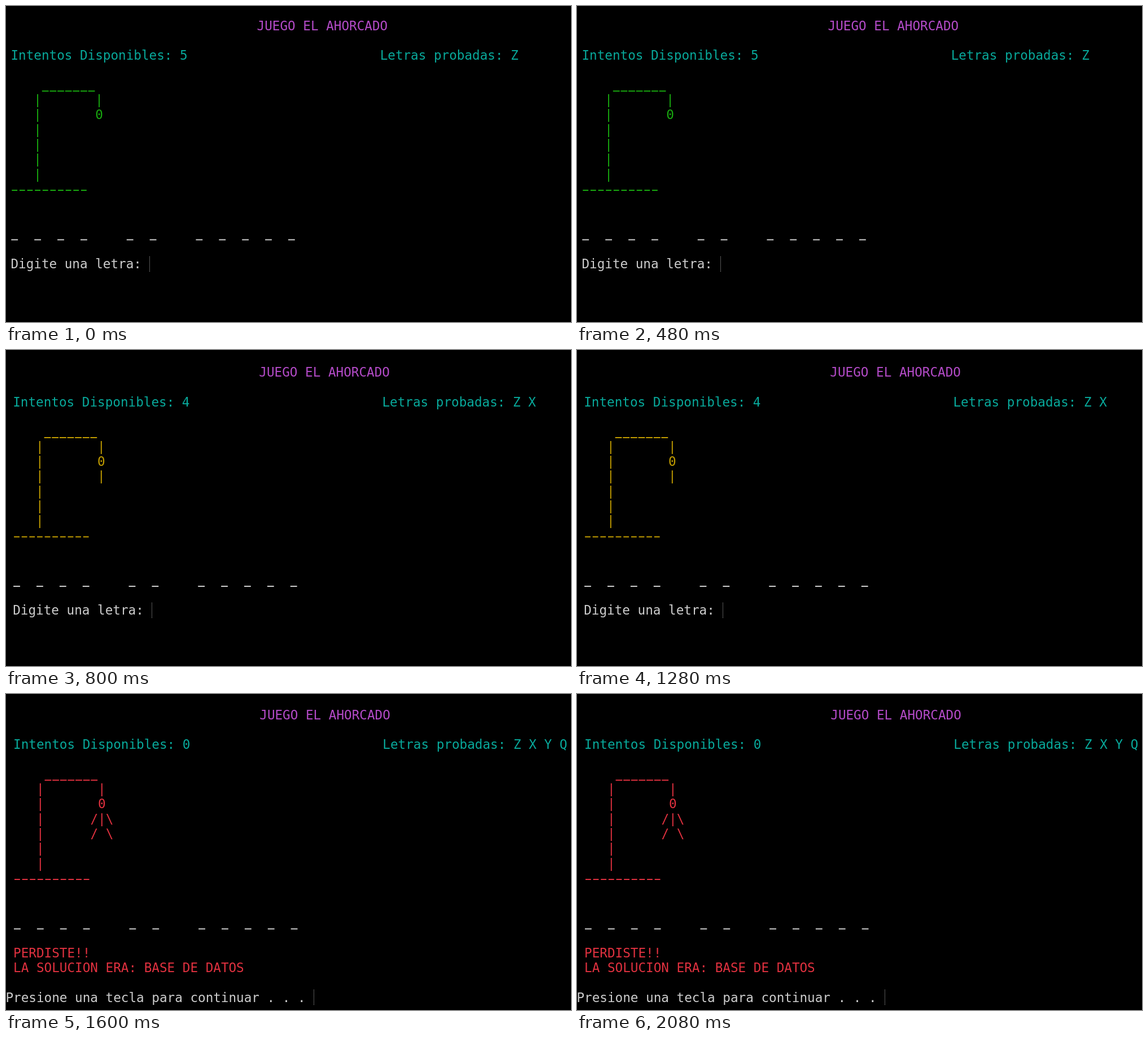
Recreate the animation shown at these times as an HTML page. Size 1001x559 px, loop 2400 ms.

```html
<!DOCTYPE html>
<html lang="es">
<head>
<meta charset="utf-8">
<title>Juego el ahorcado</title>
<style>
  html, body { margin: 0; width: 100%; height: 100%; overflow: hidden; background: #000; }
  svg { display: block; width: 1001px; height: 559px; }
  text { font: 22.64px "DejaVu Sans Mono", monospace; white-space: pre; fill: currentColor; }
  .title { color: #b44bc8; }
  .info { color: #08a99b; }
  .plain { color: #ccc; }
  .green { color: #18a80f; }
  .gold { color: #c19c00; }
  .red { color: #e0313f; }
  .rule { stroke: currentColor; stroke-width: 1.9; }
  .cursor { stroke: #aaa; stroke-width: 1; stroke-dasharray: 1 1; }
  .screen { visibility: hidden; animation: show 2400ms step-end infinite; }
  .screen:nth-child(2) { animation-delay: -1600ms; }
  .screen:nth-child(3) { animation-delay: -800ms; }
  @keyframes show {
    0% { visibility: visible; }
    33.3333% { visibility: hidden; }
  }
</style>
</head>
<body>
<svg id="stage" viewBox="0 0 1001 559"></svg>
<script>
  const COL = 13.63, ROW = 26.32;

  const text = (col, row, cls, str) =>
    `<text class="${cls}" x="${col * COL}" y="${row * ROW}">${str}</text>`;

  // Row of short strokes, one per character cell
  const rule = (col, row, count, cls, dy, inset, step = 1) => {
    const y = Math.round(row * ROW) + dy;
    let d = '';
    for (let i = 0; i < count; i++) {
      d += `M${(col + i * step) * COL + inset} ${y}h${COL - 2 * inset}`;
    }
    return `<path class="rule ${cls}" d="${d}"/>`;
  };

  const gallows = (cls, body) => {
    let out = rule(4, 4, 7, cls, 3, 0.9) + rule(0, 11, 10, cls, -6.5, 1.9);
    for (let r = 5; r < 11; r++) out += text(3, r, cls, '|');
    out += text(11, 5, cls, '|') + text(11, 6, cls, '0');
    body.forEach((part, i) => { out += text(10, 7 + i, cls, part); });
    return out;
  };

  const screen = ({ x, y, tries, tried, cls, body, end, cursor }) =>
    `<g class="screen"><g transform="translate(${x} ${y})">` +
    text(32, 0, 'title', 'JUEGO EL AHORCADO') +
    text(0, 2, 'info', 'Intentos Disponibles: ' + tries) +
    text(48, 2, 'info', 'Letras probadas: ' + tried) +
    gallows(cls, body) +
    rule(0, 14, 4, 'plain', 3, 0.9, 3) +
    rule(15, 14, 2, 'plain', 3, 0.9, 3) +
    rule(24, 14, 5, 'plain', 3, 0.9, 3) +
    end +
    `</g><path class="cursor" d="M${cursor[0] + 0.5} ${cursor[1]}v27"/></g>`;

  const ask = text(0, 16, 'plain', 'Digite una letra: ');
  const lost = text(0, 16, 'red', 'PERDISTE!!') +
    text(0, 17, 'red', 'LA SOLUCION ERA: BASE DE DATOS') +
    text(-1, 19, 'plain', 'Presione una tecla para continuar . . . ');

  document.getElementById('stage').innerHTML = [
    { x: 8.4, y: 42.5, tries: 5, tried: 'Z', cls: 'green', body: [], end: ask, cursor: [254, 443] },
    { x: 12.2, y: 47, tries: 4, tried: 'Z X', cls: 'gold', body: [' |'], end: ask, cursor: [258, 447] },
    { x: 13.1, y: 44.5, tries: 0, tried: 'Z X Y Q', cls: 'red', body: ['/|\\', '/ \\'], end: lost, cursor: [545, 523] }
  ].map(screen).join('');
</script>
</body>
</html>
```
